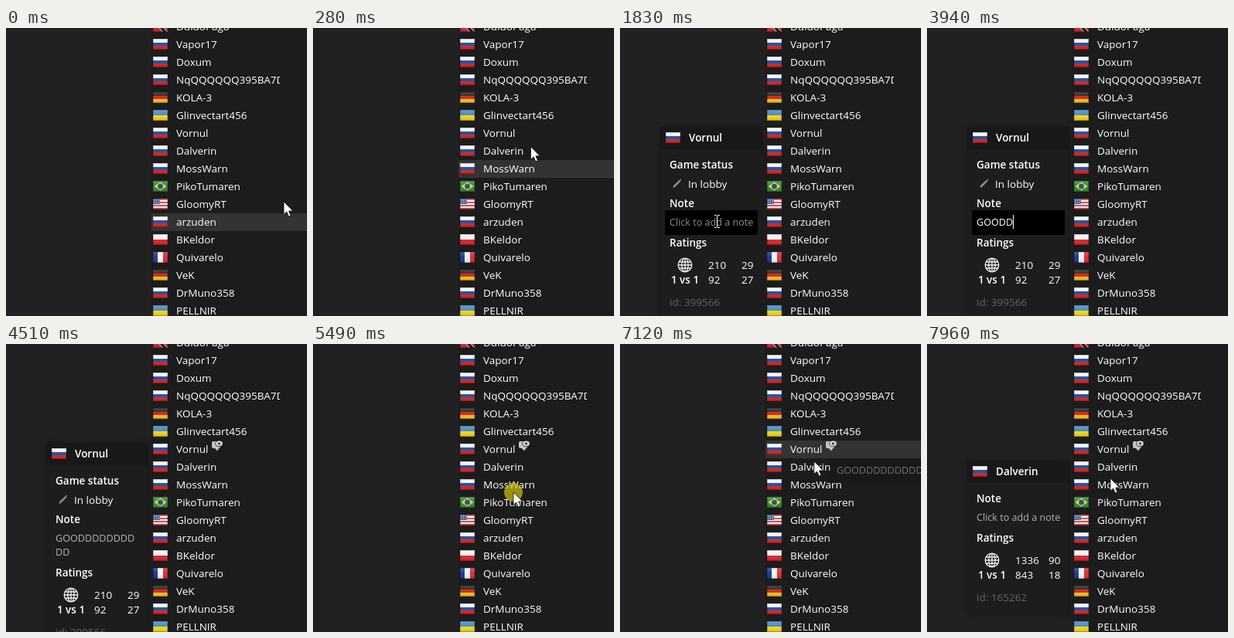
An HTML page with a canvas that plays this animation: 389 by 373 pixels, repeating every 7.99 s.

```html
<!DOCTYPE html>
<html lang="en">
<head>
<meta charset="utf-8">
<title>Player notes</title>
<style>
  html, body { margin: 0; width: 100%; height: 100%; overflow: hidden; background: #212121; }
  canvas { display: block; }
</style>
</head>
<body>
<canvas id="stage" width="389" height="373"></canvas>
<script>
const LOOP = 7990, ROW = 23, HOVER_LAG = 70;
const ctx = document.getElementById('stage').getContext('2d');

const players = [
  ['tt', 'DuldoPaga'], ['ru', 'Vapor17'], ['ru', 'Doxum'], ['ru', 'NqQQQQQQ395BA7D'],
  ['de', 'KOLA-3'], ['ua', 'Glinvectart456'], ['ru', 'Vornul'], ['ru', 'Dalverin'],
  ['ru', 'MossWarn'], ['br', 'PikoTumaren'], ['us', 'GloomyRT'], ['ru', 'arzuden'],
  ['pl', 'BKeldor'], ['fr', 'Quivarelo'], ['de', 'VeK'], ['ru', 'DrMuno358'], ['ua', 'PELLNIR']
];
const NOTED = 6, SECOND = 7;
const rowCenter = i => i * ROW - 2;

// time, x, y of the pointer tip
const path = [
  [-HOVER_LAG, 361, 246], [0, 359, 225], [40, 358, 225], [390, 258, 132], [450, 256, 129],
  [540, 256, 129], [720, 261, 189], [810, 236, 192], [1260, 125, 250], [5150, 125, 250],
  [5360, 259, 192], [5540, 259, 192], [5920, 252, 142], [7000, 252, 142], [7110, 251, 151],
  [7150, 250, 157], [7480, 250, 157], [7900, 237, 174], [LOOP, 237, 174]
];
const clicks = [[410, 530], [1280, 1400], [5380, 5520], [7330, 7460]];
const keys = [[2320, 'G'], [2540, 'O'], [2660, 'O'], [3380, 'D']];
const REPEAT_FROM = 3935, REPEAT_STEP = 31, REPEATS = 9;
const carets = [[1300, 1825], [2285, 3215], [3380, 4440]];
const FOCUS = 1300, SAVED = 4440;

const clamp = v => Math.max(0, Math.min(1, v));
const ramp = (t, from, to) => clamp((t - from) / (to - from));
const within = (t, [from, to]) => t >= from && t < to;

function pointerAt(t) {
  const i = Math.max(1, path.findIndex(p => p[0] > t));
  const [t0, x0, y0] = path[i - 1], [t1, x1, y1] = path[i];
  const p = ramp(t, t0, t1), e = p * p * (3 - 2 * p);
  return { x: x0 + (x1 - x0) * e, y: y0 + (y1 - y0) * e };
}

function noteAt(t) {
  const typed = keys.filter(k => t >= k[0]).map(k => k[1]).join('');
  const repeats = t < REPEAT_FROM ? 0 : Math.min(REPEATS, Math.floor((t - REPEAT_FROM) / REPEAT_STEP) + 1);
  return typed + 'D'.repeat(repeats);
}

function rect(x, y, w, h, color) {
  ctx.fillStyle = color;
  ctx.fillRect(x, y, w, h);
}

function text(str, x, y, { color = '#fff', size = 13.5, weight = 400, align = 'left' } = {}) {
  ctx.font = `${weight} ${size}px "Open Sans", "Noto Sans", sans-serif`;
  ctx.textAlign = align;
  ctx.fillStyle = color;
  ctx.fillText(str, x, y + 5);
}

function polygon(points, color) {
  ctx.beginPath();
  points.forEach(([x, y]) => ctx.lineTo(x, y));
  ctx.closePath();
  ctx.fillStyle = color;
  ctx.fill();
}

function disc(x, y, r, color, ry = r) {
  ctx.beginPath();
  ctx.ellipse(x, y, r, ry, 0, 0, 7);
  ctx.fillStyle = color;
  ctx.fill();
}

const stripes = (colors, vertical) => () => colors.forEach((color, i) => {
  const edge = k => Math.round(k * (vertical ? 19 : 14) / colors.length);
  const from = edge(i), size = edge(i + 1) - from;
  vertical ? rect(from, 0, size, 14, color) : rect(0, from, 19, size, color);
});

const flags = {
  ru: stripes(['#f4f4f4', '#1f4ea6', '#d8241f']),
  de: stripes(['#222', '#d5241c', '#f4c51c']),
  ua: stripes(['#4389c6', '#f5d616']),
  pl: stripes(['#f2f2f2', '#d8242f']),
  fr: stripes(['#1f3590', '#f4f4f4', '#dd2935'], true),
  tt() {
    rect(0, 0, 19, 14, '#cf2030');
    polygon([[0, 0], [7, 0], [19, 14], [12, 14]], '#eee');
    polygon([[1, 0], [6, 0], [18, 14], [13, 14]], '#191919');
  },
  br() {
    rect(0, 0, 19, 14, '#2b8a3e');
    polygon([[9.5, 1.5], [17.5, 7], [9.5, 12.5], [1.5, 7]], '#eed52c');
    disc(9.5, 7, 3.4, '#27479a');
  },
  us() {
    for (let i = 0; i < 7; i++) rect(0, i * 2, 19, 2, i % 2 ? '#f2f2f2' : '#cf4a50');
    rect(0, 0, 9, 7, '#3d5a96');
    for (let i = 0; i < 6; i++) rect(1 + i % 3 * 3, 1.5 + (i / 3 | 0) * 3, 1, 1, '#dfe6f2');
  }
};

function flag(code, x, cy) {
  ctx.save();
  ctx.translate(x, cy - 7);
  flags[code]();
  const gloss = ctx.createLinearGradient(0, 0, 0, 14);
  gloss.addColorStop(0, 'rgba(255,255,255,.2)');
  gloss.addColorStop(.5, 'rgba(255,255,255,.02)');
  gloss.addColorStop(1, 'rgba(0,0,0,.15)');
  rect(0, 0, 19, 14, gloss);
  ctx.strokeStyle = 'rgba(0,0,0,.2)';
  ctx.lineWidth = 1;
  ctx.strokeRect(.5, .5, 18, 13);
  ctx.restore();
}

function noteIcon(background) {
  ctx.fillStyle = '#c4c4c4';
  ctx.beginPath();
  ctx.roundRect(266, 126, 11, 9, 2);
  ctx.fill();
  polygon([[269, 134], [276, 134], [273, 138.5]], '#c4c4c4');
  disc(275.5, 129, 5.2, background, 4.2);
  disc(275.5, 129, 4.4, '#d2d2d2', 3.4);
  disc(275.5, 129, 1.5, '#333');
}

function list(hover, t) {
  rect(0, 0, 389, 373, '#212121');
  rect(188, 0, 201, 373, '#1c1c1c');
  if (hover >= 0) rect(188, rowCenter(hover) - 11, 201, ROW, '#333');
  ctx.save();
  ctx.beginPath();
  ctx.rect(188, 0, 166, 373);
  ctx.clip();
  players.forEach(([code, name], i) => {
    flag(code, 190, rowCenter(i));
    text(name, 220, rowCenter(i));
  });
  ctx.restore();
  if (t >= SAVED) noteIcon(hover === NOTED ? '#333' : '#1c1c1c');
}

function globe(x, y) {
  ctx.strokeStyle = '#f0f0f0';
  ctx.lineWidth = 1.3;
  ctx.beginPath();
  ctx.arc(x, y, 8.8, 0, 7);
  ctx.moveTo(x + 4.2, y);
  ctx.ellipse(x, y, 4.2, 8.8, 0, 0, 7);
  ctx.moveTo(x, y - 9);
  ctx.lineTo(x, y + 9);
  for (const [dy, w] of [[-4, 7.6], [0, 8.8], [4, 7.6]]) {
    ctx.moveTo(x - w, y + dy);
    ctx.lineTo(x + w, y + dy);
  }
  ctx.stroke();
}

function noteField(y, lines, editing, caret) {
  const empty = !lines[0];
  if (editing) {
    ctx.fillStyle = '#000';
    ctx.beginPath();
    ctx.roundRect(58, y - 15, 120, 14 + lines.length * 18, 2);
    ctx.fill();
  }
  const color = empty ? (editing ? '#8c8c8c' : '#b0b0b0') : (editing ? '#fff' : '#b4b4b4');
  (empty ? ['Click to add a note'] : lines).forEach((line, i) =>
    text(line, 64, y + i * 18, { size: 12.6, color }));
  if (caret) {
    const last = lines[lines.length - 1];
    ctx.font = '400 12.6px "Open Sans", "Noto Sans", sans-serif';
    rect(Math.round(64 + ctx.measureText(last).width), y - 9 + (lines.length - 1) * 18, 1, 18, '#fff');
  }
}

function card({ row, status, ratings, id, note = '', editing, caret }, shown, slide) {
  if (shown <= 0) return;
  const top = rowCenter(row) - 8, bold = { weight: 600 };
  const lines = note.length > 11 ? [note.slice(0, 11), note.slice(11)] : [note];
  const noteY = top + (status ? 99 : 49);
  const ratingY = noteY + 51 + (lines.length - 1) * 18;
  ctx.save();
  ctx.globalAlpha = shown;
  ctx.translate(slide, 0);
  ctx.shadowColor = 'rgba(0,0,0,.35)';
  ctx.shadowBlur = 7;
  rect(52, top, 132, ratingY + 99 - top, '#1d1d1d');
  ctx.shadowColor = 'transparent';
  rect(52, top, 132, 29, '#181818');
  flag(players[row][0], 59, top + 14);
  text(players[row][1], 89, top + 14, bold);
  if (status) {
    text('Game status', 64, top + 49, bold);
    polygon([[79, top + 67], [78, top + 71], [71, top + 78], [68, top + 79], [70, top + 75]], '#8d8d8d');
    text(status, 88, top + 74);
  }
  text('Note', 64, noteY, bold);
  noteField(noteY + 24, lines, editing, caret);
  text('Ratings', 64, ratingY, bold);
  globe(84, ratingY + 29);
  text('1 vs 1', 84, ratingY + 48, { weight: 600, align: 'center' });
  ratings.forEach(([rating, games], i) => {
    text(rating, 114, ratingY + 29 + i * 19);
    text(games, 157, ratingY + 29 + i * 19);
  });
  text('id: ' + id, 64, ratingY + 77, { color: '#636363' });
  ctx.restore();
}

function tooltip(note, shown) {
  if (shown <= 0) return;
  ctx.save();
  ctx.globalAlpha = shown;
  ctx.shadowColor = 'rgba(0,0,0,.4)';
  ctx.shadowBlur = 5;
  rect(272, 150, 130, 28, '#1a1a1a');
  ctx.shadowColor = 'transparent';
  text(note, 280, 163, { size: 12.6, color: '#a9b3b7' });
  ctx.restore();
}

function pointer({ x, y }, beam, pressed) {
  if (pressed) disc(x, y, 12, 'rgba(205,195,15,.7)');
  ctx.save();
  ctx.translate(x, y);
  if (beam) {
    ctx.translate(Math.round(x) - x, Math.round(y) - y);
    for (const [left, top, w, h] of [[-3, -8, 3, 1], [1, -8, 3, 1], [0, -7, 1, 15], [-3, 8, 3, 1], [1, 8, 3, 1]])
      rect(left, top, w, h, '#fff');
  } else {
    polygon([[0, 0], [0, 16.5], [3.7, 13], [6.3, 19], [9, 17.9], [6.5, 12], [11.8, 12]], '#fff');
    ctx.strokeStyle = '#111';
    ctx.lineWidth = .8;
    ctx.stroke();
  }
  ctx.restore();
}

function draw(t) {
  const at = pointerAt(t);
  const note = noteAt(t);
  const editing = t >= FOCUS && t < SAVED;
  const easeIn = from => 1 - Math.pow(1 - ramp(t, from, from + 280), 3);
  const first = easeIn(510), second = easeIn(7470);
  const blocked = within(t, [510, 5545]) || t >= 7470;
  const hover = blocked ? -1 : Math.round((pointerAt(t - HOVER_LAG).y + 2) / ROW);

  list(hover, t);
  card({
    row: NOTED, status: 'In lobby', ratings: [['210', '29'], ['92', '27']], id: '399566',
    note, editing, caret: carets.some(c => within(t, c))
  }, first * (1 - ramp(t, 5390, 5485)), 20 * (1 - first));
  card({
    row: SECOND, ratings: [['1336', '90'], ['843', '18']], id: '165262'
  }, second, 20 * (1 - second));
  tooltip(note, t < 7150 ? ramp(t, 6215, 6360) * (1 - ramp(t, 7020, 7260)) : 0);

  const overNote = at.x < 178 && Math.abs(at.y - 252) < 16 && t < 5300;
  if (!within(t, [2290, 5150])) pointer(at, overNote, clicks.some(c => within(t, c)));
}

let start;
function frame(now) {
  start ??= now;
  draw((now - start) % LOOP);
  requestAnimationFrame(frame);
}
draw(0);
requestAnimationFrame(frame);
</script>
</body>
</html>
```
